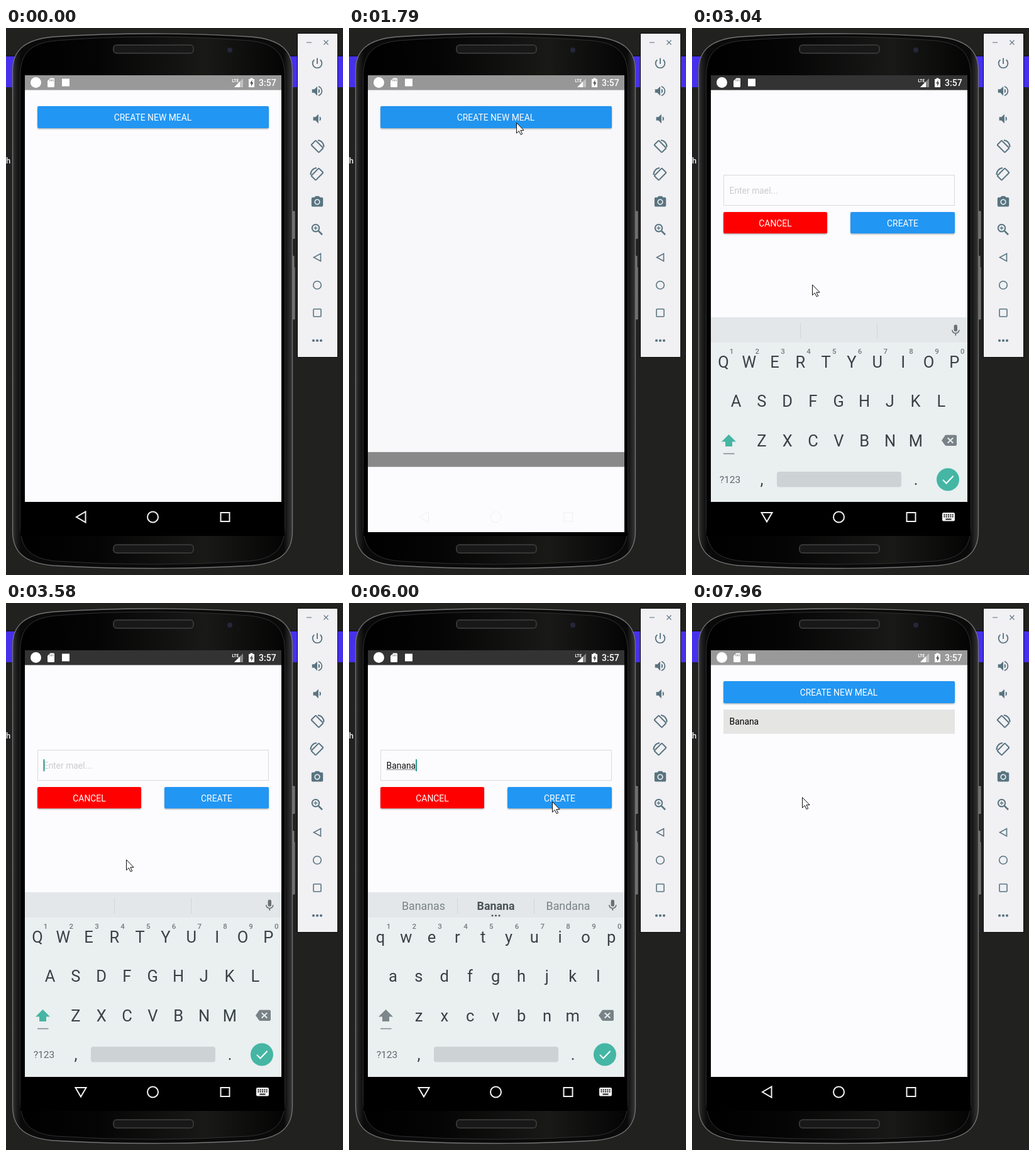
Animation, 536 px wide and 868 px high, one loop 8000 ms. Source, as an HTML page:

```html
<!DOCTYPE html>
<html lang="en">
<head>
<meta charset="utf-8">
<title>Meal list</title>
<style>
html, body { margin: 0; width: 100%; height: 100%; overflow: hidden; background: #212120; }
svg { display: block; width: 536px; height: 868px; font-family: Roboto, sans-serif; }
text { white-space: pre; }
.mid { text-anchor: middle; }
.label { font-size: 13.9px; fill: #fff; text-anchor: middle; }
.body { font-size: 13.9px; }
.key { font-size: 25.5px; fill: #394246; text-anchor: middle; }
.digit { font-size: 11.5px; font-weight: 500; fill: #727b7f; text-anchor: middle; }
.hint { font-size: 17.8px; fill: #798388; text-anchor: middle; }
.line { fill: none; stroke-width: 2; }
</style>
</head>
<body>
<svg viewBox="0 0 536 868">
  <defs>
    <clipPath id="screenClip"><rect x="30" y="75" width="408" height="725"/></clipPath>
    <clipPath id="appClip"><rect x="30" y="75" width="408" height="677"/></clipPath>
    <linearGradient id="rim">
      <stop offset="0" stop-color="#383838"/><stop offset=".012" stop-color="#1e1e1e"/>
      <stop offset=".03" stop-color="#0a0a0a"/><stop offset=".97" stop-color="#0a0a0a"/>
      <stop offset=".988" stop-color="#262626"/><stop offset="1" stop-color="#383838"/>
    </linearGradient>
    <linearGradient id="face">
      <stop offset="0" stop-color="#000"/><stop offset=".3" stop-color="#050505"/>
      <stop offset=".7" stop-color="#191918"/><stop offset="1" stop-color="#040404"/>
    </linearGradient>
    <filter id="shade" x="-5%" y="-30%" width="110%" height="160%">
      <feDropShadow dx="0" dy="1.300" stdDeviation="1.300" flood-opacity=".32"/>
    </filter>
    <g id="turn">
      <rect x="-8.500" y="-5" width="17" height="10" rx="1" transform="rotate(45)"/>
      <path d="M1-10A10.500 10.500 0 0 1 10.500 1"/>
    </g>
  </defs>

  <!-- desktop -->
  <rect width="536" height="868" fill="#212120"/>
  <rect y="45" width="536" height="49" fill="#4630eb"/>
  <path d="M0 44.500H536" stroke="#0c0c0c"/>
  <text x="0" y="215" font-size="13" font-weight="500" fill="#f0f0f0">h</text>

  <!-- phone body -->
  <path d="M456 291h3v43h-3M456 362h2v18h1v82h-3" fill="#6c6c6c" stroke="#9a9a9a" stroke-width=".7"/>
  <path d="M10.500 66C11 34 32 18 75 14Q150 9 233 9T391 14C434 18 455 34 455.500 66V800C455 832 436 849 391 853Q310 857.500 233 857.500T75 853C30 849 11 832 10.500 800Z" fill="url(#rim)" stroke="#747474" stroke-width="1.300"/>
  <path d="M22.500 80C22 40 38 24 80 20Q155 14 233 14T386 20C428 24 444 40 443.500 80V786C444 826 428 842 386 846Q310 851 233 851T80 846C38 842 22 826 22.500 786Z" fill="url(#face)" stroke="#303030"/>
  <rect x="23" y="76" width="420" height="730" fill="#000"/>
  <g fill="#181818" stroke="#363636" stroke-width="2">
    <rect x="171" y="27" width="127" height="13" rx="5"/>
    <rect x="171" y="820" width="127" height="13" rx="5"/>
  </g>
  <circle cx="356" cy="35" r="4" fill="#25273a"/>

  <!-- emulator tools -->
  <rect x="463.500" y="8.500" width="64" height="514" fill="#f1f0f3" stroke="#0c0c0c"/>
  <g id="tools" fill="#587480"></g>
  <g class="line" stroke="#587480">
    <path d="M478 23h8M505.500 19.500l7 7m0-7l-7 7" stroke-width="1.200"/>
    <use href="#turn" transform="translate(495 188)"/>
    <use href="#turn" transform="translate(495 232) scale(-1 1)"/>
    <circle cx="492.500" cy="317.500" r="5.700"/><path d="M497 322l6 6" stroke-width="2.500"/>
    <path d="M489.500 317.500h6m-3-3v6" stroke-width="1.300"/>
    <path d="M500.500 358v12l-11-6z" stroke-width="1.600"/>
    <circle cx="495" cy="408" r="6.300" stroke-width="1.600"/>
    <rect x="489" y="446" width="12" height="12" rx="1" stroke-width="1.600"/>
  </g>
  <path d="M489 496h.01m5.990 0h.01m5.990 0h.01" stroke="#587480" stroke-width="4.200" stroke-linecap="round"/>

  <!-- list screen -->
  <g clip-path="url(#screenClip)">
    <rect x="30" y="75" width="408" height="677" fill="#fcfcfe"/>
    <rect x="30" y="75" width="408" height="23.500" fill="#999"/>
    <rect x="50" y="124" width="368" height="35" rx="2" fill="#2196f3" filter="url(#shade)"/>
    <text class="label" x="233.500" y="147">CREATE NEW MEAL</text>
    <g id="item">
      <rect x="50" y="169" width="368" height="38.500" fill="#e5e5e4"/>
      <text class="body" x="59.500" y="193">Banana</text>
    </g>
    <rect id="dim" x="30" y="75" width="408" height="677"/>

    <!-- dialog -->
    <g id="modal">
      <rect x="30" y="98" width="408" height="702" fill="#fcfcfe"/>
      <rect id="modalBar" x="30" y="75" width="408" height="23.500"/>
      <g id="form">
        <rect x="50.500" y="379.500" width="367" height="48" fill="none" stroke="#dadada"/>
        <text class="body" id="field" x="59.500" y="408.500"></text>
        <rect id="underline" x="59.500" y="410" height="1" fill="#8a8a8a"/>
        <rect id="caret" y="394" width="1.800" height="19" fill="#159484"/>
        <rect x="50" y="438" width="165" height="34" rx="2" fill="#fe0000" filter="url(#shade)"/>
        <rect x="252" y="438" width="166" height="34" rx="2" fill="#2196f3" filter="url(#shade)"/>
        <text class="label" x="132.500" y="460.500">CANCEL</text>
        <text class="label" x="335" y="460.500">CREATE</text>
      </g>
    </g>
  </g>

  <!-- keyboard -->
  <g clip-path="url(#appClip)"><g id="keyboard">
    <rect x="30" y="459" width="408" height="293" fill="#eaeff0"/>
    <rect x="30" y="459" width="408" height="40" fill="#e3e7e9"/>
    <path d="M172.500 468v25M294.500 468v25" stroke="#d0d5d7"/>
    <g id="hints">
      <text class="hint" x="118.500" y="487"></text>
      <text class="hint" x="233.500" y="487" font-weight="700" style="fill:#4b5458"></text>
      <text class="hint" x="348.500" y="487"></text>
      <path d="M228 496h.01m5.490 0h.01m5.490 0h.01" stroke="#4b5458" stroke-width="3" stroke-linecap="round"/>
    </g>
    <path transform="translate(408.500 469) scale(.9)" fill="#687176" d="M12 14a3 3 0 0 0 3-3V5a3 3 0 0 0-6 0v6a3 3 0 0 0 3 3zm5.300-3a5.300 5.300 0 0 1-10.600 0H5a7 7 0 0 0 6 6.720V21h2v-3.280A7 7 0 0 0 19 11h-1.700z"/>
    <g id="keys"></g>
    <path id="shift" d="M58.500 645L70 656.500h-6V664H53v-7.500h-6z"/>
    <path d="M50 675.500h17.500" stroke="#7f898d" stroke-width="1.500"/>
    <path transform="translate(397 643) scale(1 .95)" fill="#788287" d="M22 3H7c-.69 0-1.230.35-1.590.88L0 12l5.410 8.110c.36.53.9.89 1.590.89h15a2 2 0 0 0 2-2V5a2 2 0 0 0-2-2zm-3 12.590L17.590 17 14 13.410 10.410 17 9 15.590 12.590 12 9 8.410 10.410 7 14 10.590 17.590 7 19 8.410 15.410 12z"/>
    <text class="mid" x="60.500" y="722" font-size="15.500" fill="#5e686d">?123</text>
    <text class="key" x="111" y="725">,</text>
    <text class="key" x="356" y="725">.</text>
    <rect x="135" y="704" width="198" height="24.500" rx="4" fill="#cdd2d4"/>
    <circle cx="407" cy="716.500" r="18" fill="#45b6a4"/>
    <path class="line" d="M399 717l5.500 5.500 11-11.500" stroke="#fff"/>
  </g></g>

  <!-- status icons -->
  <g fill="#fff">
    <circle cx="47.500" cy="86.500" r="8.500"/>
    <path d="M70.500 79.500h5q1.500 0 1.500 1.500v11.500q0 1.500-1.500 1.500h-8q-1.500 0-1.500-1.500V84z"/>
    <path d="M70 81.500v3m2.500-3v3m2.500-3v3" stroke="#777"/>
    <rect x="89" y="80.500" width="12" height="12"/>
    <text x="359.500" y="86" font-size="6.500" font-weight="700">LTE</text>
    <path d="M377 80v14h-14z" fill-opacity=".4"/><path d="M372 85v9h-9z"/>
    <path d="M388.500 79.500h4V81h2.500v13h-9V81h2.500z"/>
    <path d="M391.500 82.500v4h2l-3.500 6v-4.500h-2z" fill="#555"/>
    <text x="402" y="92" font-size="14" font-weight="500">3:57</text>
  </g>

  <!-- navigation bar -->
  <rect id="navBack" x="30" y="752" width="408" height="48" fill="#000"/>
  <g id="navIcons" class="line">
    <path id="back"/>
    <circle cx="233.500" cy="776" r="8.500"/>
    <rect x="341.500" y="769" width="14" height="14"/>
  </g>
  <g id="navKeys">
    <rect x="398" y="769" width="20" height="13.500" rx="2" fill="#f2f2f2"/>
    <path d="M400.500 772.500h15.500M400.500 775.500h15.500" stroke="#111" stroke-width="1.800" stroke-dasharray="1.800 1.500"/>
    <path d="M403.500 779.500h9" stroke="#111" stroke-width="1.800"/>
  </g>

  <path id="cursor" d="M.5.500V17l3.900-3.600 2.800 5.900 2.500-1.200-2.800-5.700h5.200z" fill="#fff" stroke="#111"/>
</svg>
<script>
const LOOP = 8000;
const $ = id => document.getElementById(id);
const show = (el, on) => { el.style.display = on ? '' : 'none'; };
const shiftY = (el, y) => el.setAttribute('transform', `translate(0 ${y})`);
const ramp = (t, a, b) => Math.min(1, Math.max(0, (t - a) / (b - a)));
const ease = p => (1 - Math.cos(Math.PI * p)) / 2;

function add(parent, tag, attrs, text = '') {
  const el = document.createElementNS('http://www.w3.org/2000/svg', tag);
  for (const name in attrs) el.setAttribute(name, attrs[name]);
  el.textContent = text;
  parent.append(el);
  return el;
}

const toolIcons = [
  [56, 'M13 3h-2v10h2V3zm4.830 2.170l-1.420 1.420A6.920 6.920 0 0 1 19 12a7 7 0 1 1-11.420-5.400L6.170 5.170A8.930 8.930 0 0 0 3 12a9 9 0 0 0 18 0c0-2.740-1.230-5.180-3.170-6.830z'],
  [100, 'M3 9v6h4l5 5V4L7 9H3zm13.500 3A4.500 4.500 0 0 0 14 7.970v8.050A4.480 4.480 0 0 0 16.500 12zM14 3.230v2.060a7 7 0 0 1 0 13.420v2.060a9 9 0 0 0 0-17.540z'],
  [144, 'M5 9v6h4l5 5V4L9 9H5zm13.500 3A4.500 4.500 0 0 0 16 7.970v8.050A4.480 4.480 0 0 0 18.500 12z'],
  [276, 'M9 2L7.170 4H4a2 2 0 0 0-2 2v12a2 2 0 0 0 2 2h16a2 2 0 0 0 2-2V6a2 2 0 0 0-2-2h-3.170L15 2H9zm3 15a5 5 0 1 1 0-10 5 5 0 0 1 0 10zm0-1.800a3.200 3.200 0 1 0 0-6.400 3.200 3.200 0 0 0 0 6.400z']
];
for (const [y, d] of toolIcons)
  add($('tools'), 'path', { d, transform: `translate(484 ${y - 11}) scale(.92)` });

const letterKeys = [];
[['QWERTYUIOP', 50, 539], ['ASDFGHJKL', 70, 601], ['ZXCVBNM', 111, 664]].forEach(([row, x0, y], r) => {
  [...row].forEach((letter, i) => {
    const x = x0 + 40.8 * i;
    letterKeys.push([letter, add($('keys'), 'text', { class: 'key', x, y })]);
    if (r === 0) add($('keys'), 'text', { class: 'digit', x: x + 13, y: 517 }, (i + 1) % 10);
  });
});

// Screen refreshes as runs of [first, last, count].
const refreshes = [
  [0, 0, 1], [170, 960, 15], [1040, 1040, 1], [1380, 1380, 1], [1500, 2170, 11],
  [2250, 2250, 1], [2330, 3040, 11], [3130, 3580, 7], [3670, 3880, 6], [3960, 4750, 12],
  [4790, 5540, 12], [5630, 6000, 8], [6330, 6540, 4], [6630, 7080, 10], [7170, 7540, 8], [7710, 7960, 5]
].flatMap(([a, b, n]) => Array.from({ length: n }, (_, i) => a + (b - a) * i / Math.max(1, n - 1)));

// Pointer stops: [time, x, y].
const stops = [
  [480, 540, 260], [1040, 301, 168], [1400, 301, 168], [1560, 270, 142], [1720, 268, 144],
  [2200, 191, 407], [5560, 191, 407], [6000, 323, 315], [6250, 323, 315], [6540, 116, 480],
  [6750, 116, 480], [7500, 196, 140], [7640, 196, 140], [7960, 175, 308]
];

const word = 'Banana';
const keyTimes = [4000, 4200, 4380, 4600, 4800, 4980];
const suggestions = [
  ['', ''], ['But', 'By'], ['Bad', 'Back'], ['Band', 'Bank'],
  ['Banana', 'Bandana'], ['Banana', 'Bananas'], ['Bananas', 'Bandana']
];

function pointer(t) {
  const i = stops.findIndex(s => s[0] >= t);
  if (i < 1) return stops[0].slice(1);
  const [a, x0, y0] = stops[i - 1], [b, x1, y1] = stops[i];
  const p = ease(ramp(t, a, b));
  return [x0 + (x1 - x0) * p, y0 + (y1 - y0) * p];
}

function drawForm(t) {
  const count = keyTimes.filter(k => k <= t).length;
  const typed = word.slice(0, count);
  const field = $('field');
  field.textContent = typed || 'Enter mael...';
  field.setAttribute('fill', count ? '#111' : '#cbcbcd');
  const width = count ? field.getComputedTextLength() : 0;
  $('underline').setAttribute('width', width);
  $('caret').setAttribute('x', 59.5 + width);
  const since = t - (count ? keyTimes[count - 1] : 2500);
  show($('caret'), since >= 0 && since % 1000 < 500);

  const [left, right] = suggestions[count];
  show($('hints'), count > 0);
  [left, typed, right].forEach((s, i) => { $('hints').children[i].textContent = s; });
  for (const [letter, el] of letterKeys) el.textContent = count ? letter.toLowerCase() : letter;
  $('shift').setAttribute('fill', count ? '#7d878b' : '#46b5a3');
}

function draw(now) {
  const t = refreshes.findLast(r => r <= now + .01);
  const opening = ease(ramp(t, 1680, 2000)), closing = ease(ramp(t, 6295, 6614));
  const slide = t < 4000 ? 1 - opening : closing;
  const moving = slide > 0 && slide < 1;
  show($('modal'), slide < 1);
  shiftY($('modal'), slide * 725);
  $('modalBar').setAttribute('fill', moving ? '#898989' : '#333');
  $('dim').setAttribute('opacity', .1 * (t < 4000 ? opening : 1 - ramp(t, 6600, 6830)));
  show($('item'), t >= 6330);

  const raised = ramp(t, 2560, 2780) - ramp(t, 6290, 6430);
  show($('keyboard'), raised > 0);
  shiftY($('keyboard'), (1 - raised) * 293);
  const typing = t >= 2620 && t < 6330;
  shiftY($('form'), typing ? -146 : 0);
  drawForm(t);

  show($('navBack'), !moving);
  $('navIcons').setAttribute('stroke', moving ? '#f0f0f0' : '#f2f2f2');
  $('navIcons').style.strokeWidth = moving ? 1 : 2;
  $('back').setAttribute('d', typing ? 'M110.500 769h17l-8.500 14.500z' : 'M126.500 767.500v17l-14.500-8.500z');
  show($('navKeys'), typing);

  show($('cursor'), t > 480);
  $('cursor').setAttribute('transform', `translate(${pointer(t).map(Math.round)})`);
}

function tick() {
  draw(performance.now() % LOOP);
  requestAnimationFrame(tick);
}
tick();
</script>
</body>
</html>
```
